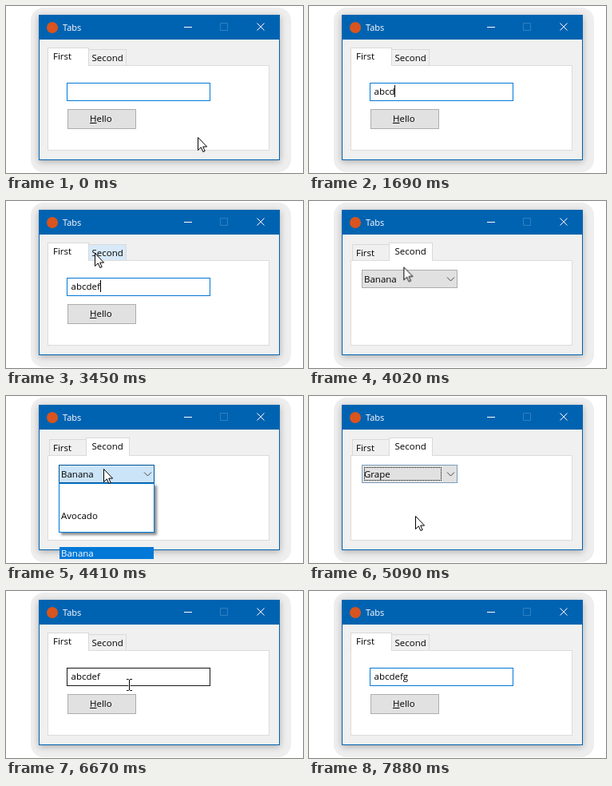
Animation, 372 px wide and 209 px high, one loop 8 s. Source, as an HTML page:

```html
<!DOCTYPE html>
<html lang="en">
<head>
<meta charset="utf-8">
<title>Tabs</title>
<style>
  html, body { margin: 0; width: 100%; height: 100%; overflow: hidden; background: #fff; }
  body { position: relative; font: 11.5px/16px "Open Sans", "Noto Sans", sans-serif; color: #000; }

  /* Every box is placed in stage pixels: x, y, width, height */
  .box, .label {
    position: absolute; box-sizing: border-box; white-space: pre;
    left: calc(var(--x) * 1px); top: calc(var(--y) * 1px);
  }
  .box { width: calc(var(--w) * 1px); height: calc(var(--h) * 1px); }
  svg { position: absolute; left: 0; top: 0; overflow: visible; }

  .halo { background: #eee; border-radius: 16px; }
  .window { background: #f0f0f0; border: 1px solid #0063b1; box-shadow: 0 2px 8px rgba(0, 0, 0, .28); }
  .title { background: #0063b1; }
  .icon { background: #d9541e; border-radius: 50%; }

  .panel { background: #fff; border: 1px solid #dcdcdc; }
  .tab { background: #f0f0f0; border: 1px solid #d9d9d9; border-bottom: 0; }
  .tab.open { background: #fff; }
  .button { background: #e1e1e1; border: 1px solid #adadad; }
  .field { background: #fff; border: 1px solid #0078d7; }
  .typed::after { content: ""; display: inline-block; height: 15px; border-right: 1px solid transparent; }
  .combo { background: #e1e1e1; border: 1px solid #adadad; }
  .choice::after { content: "Banana"; }
  .focus { border: 1px dotted #000; }
  .list { background: #fff; border: 1px solid #0078d7; box-shadow: 3px 3px 3px rgba(0, 0, 0, .45); }
  .item { height: 15px; line-height: 15px; padding-left: 2px; position: relative; }
  .hot { position: absolute; inset: 0; padding-left: 2px; background: #0078d7; color: #fff; }

  /* Timeline: 1% = 80 ms, hard changes unless a keyframe says otherwise */
  .page, .tip, .focus, .list, .hot, .arrow, .beam { opacity: 0; }
  .page, .tip, .focus, .list, .hot, .arrow, .beam, .field, .combo, .pointer,
  .typed::after, .choice::after { animation: 8s step-end infinite; }

  .first { animation-name: first; }
  .second { animation-name: second; }
  .first .tip { background: #d8eaf9; animation-name: hover-second; }
  .second .tip { background: #d8eaf9; animation-name: hover-first; }
  .field { animation-name: field; }
  .typed::after { animation-name: typing, caret; }
  .combo { animation-name: combo; }
  .choice::after { animation-name: choice; }
  .focus { animation-name: focus; }
  .list { animation-name: list; }
  .avocado { animation-name: avocado; }
  .banana { animation-name: banana; }
  .grape { animation-name: grape; }
  .pointer { animation-name: pointer; }
  .arrow { animation-name: arrow; }
  .beam { animation-name: beam; }

  @keyframes first { 0% { opacity: 1 } 46.625% { opacity: 0 } 73.375%, 100% { opacity: 1 } }
  @keyframes second { 46.625% { opacity: 1 } 73.375%, 100% { opacity: 0 } }
  @keyframes hover-second { 43.125% { opacity: 1 } 46.625%, 100% { opacity: 0 } }
  @keyframes hover-first { 71.75% { opacity: 1 } 73.375%, 100% { opacity: 0 } }
  @keyframes field {
    0% { border-color: #0078d7 }
    73.375% { border-color: #7a7a7a }
    80.25% { border-color: #171717 }
    88.5%, 100% { border-color: #0078d7 }
  }
  @keyframes typing {
    0% { content: "" }
    16.125% { content: "a" }
    17.75% { content: "ab" }
    19.25% { content: "abc" }
    21.125% { content: "abcd" }
    24.25% { content: "abcde" }
    27.5% { content: "abcdef" }
    91.875%, 100% { content: "abcdefg" }
  }
  @keyframes caret {
    0%, 8.125%, 34.125%, 46.625%, 98.5%, 100% { border-color: transparent }
    1.5%, 14.625%, 40.75%, 88.5% { border-color: #000 }
  }
  @keyframes combo {
    0% { background: #e1e1e1; border-color: #adadad }
    51.75%, 68.5% { background: #e5f1fb; border-color: #0078d7 }
    53.5% { background: #cce4f7; border-color: #005499 }
    63.625%, 70.125%, 100% { background: #e1e1e1; border-color: #7a9cbd }
  }
  @keyframes choice { 0% { content: "Banana" } 63.625%, 100% { content: "Grape" } }
  @keyframes focus { 63.625%, 100% { opacity: 1 } }
  @keyframes list { 53.5% { opacity: 1 } 63.625%, 100% { opacity: 0 } }
  @keyframes banana { 53.5% { opacity: 1 } 56.625%, 100% { opacity: 0 } }
  @keyframes avocado { 56.625% { opacity: 1 } 58.25%, 100% { opacity: 0 } }
  @keyframes grape { 58.25% { opacity: 1 } 63.625%, 100% { opacity: 0 } }
  @keyframes pointer {
    0% { transform: translate(240px, 164px) }
    31.125% { transform: translate(240px, 164px); animation-timing-function: steps(8, start) }
    44.825% { transform: translate(111px, 65px) }
    48.25% { transform: translate(111px, 65px); animation-timing-function: steps(3, start) }
    53.5% { transform: translate(122px, 91px) }
    56.625% { transform: translate(122px, 91px); animation-timing-function: steps(2, start) }
    59.875% { transform: translate(130px, 142px) }
    60% { transform: translate(133px, 150px) }
    65.25% { transform: translate(133px, 150px); animation-timing-function: steps(5, start) }
    73.375% { transform: translate(89px, 64px) }
    77.125% { transform: translate(89px, 64px); animation-timing-function: steps(5, start) }
    84.9375%, 100% { transform: translate(154px, 117px) }
  }
  @keyframes arrow {
    0%, 31.125% { opacity: 1 }
    16.125%, 80.25%, 100% { opacity: 0 }
  }
  @keyframes beam { 80.25% { opacity: 1 } 91.875%, 100% { opacity: 0 } }
</style>
</head>
<body>
  <div class="box halo" style="--x:31;--y:2;--w:326;--h:206"></div>
  <div class="box window" style="--x:41;--y:11;--w:302;--h:182"></div>
  <div class="box title" style="--x:41;--y:11;--w:302;--h:31"></div>
  <div class="box icon" style="--x:51;--y:20;--w:14;--h:14"></div>
  <div class="label" style="--x:71;--y:19;color:#fff;font-size:11px">Tabs</div>
  <svg width="372" height="209" fill="none" stroke="#fff">
    <path d="M223 26.5h10M314.5 21.5l9 9m0-9l-9 9"/>
    <path d="M268.5 21.5h9v9h-9z" stroke="#2f80c0"/>
  </svg>

  <div class="box panel" style="--x:52;--y:74;--w:278;--h:107"></div>

  <div class="page first">
    <div class="box tab" style="--x:103;--y:54;--w:48;--h:20"></div>
    <div class="box tab tip" style="--x:103;--y:54;--w:48;--h:20"></div>
    <div class="box tab open" style="--x:52;--y:52;--w:52;--h:23"></div>
    <div class="label" style="--x:59;--y:55">First</div>
    <div class="label" style="--x:107.5;--y:57">Second</div>
    <div class="box field" style="--x:76;--y:96;--w:180;--h:23"></div>
    <div class="label typed" style="--x:81.5;--y:99"></div>
    <div class="box button" style="--x:77;--y:129;--w:86;--h:25"></div>
    <div class="label" style="--x:105;--y:133"><u>H</u>ello</div>
  </div>

  <div class="page second">
    <div class="box tab" style="--x:54;--y:54;--w:47;--h:20"></div>
    <div class="box tab tip" style="--x:54;--y:54;--w:47;--h:20"></div>
    <div class="box tab open" style="--x:100;--y:52;--w:55;--h:23"></div>
    <div class="label" style="--x:59;--y:57">First</div>
    <div class="label" style="--x:107.5;--y:55">Second</div>
    <div class="box combo" style="--x:66;--y:86;--w:120;--h:23"></div>
    <div class="box focus" style="--x:69;--y:89;--w:97;--h:17"></div>
    <div class="label choice" style="--x:69;--y:90"></div>
    <svg width="372" height="209" fill="none" stroke="#444">
      <path d="M173 95.5l4.5 4.5 4.5-4.5"/>
    </svg>
    <div class="box list" style="--x:66;--y:109;--w:120;--h:62">
      <div class="item">Avocado<div class="hot avocado">Avocado</div></div>
      <div class="item">Banana<div class="hot banana">Banana</div></div>
      <div class="item">Grape<div class="hot grape">Grape</div></div>
      <div class="item">Orange</div>
    </div>
  </div>

  <svg class="pointer" width="1" height="1">
    <path class="arrow" d="M.5.5v16l3.8-3.6 2.5 5.6 2.4-1-2.5-5.4h4.9z" fill="#fff" stroke="#000"/>
    <g class="beam" fill="none">
      <path d="M-3 -6.5h2.5l1 1 1-1h2.5M-3 7.5h2.5l1-1 1 1h2.5M.5 -6v13" stroke="#fff" stroke-width="2.4"/>
      <path d="M-3 -6.5h2.5l1 1 1-1h2.5M-3 7.5h2.5l1-1 1 1h2.5M.5 -6v13" stroke="#000"/>
    </g>
  </svg>
</body>
</html>
```
